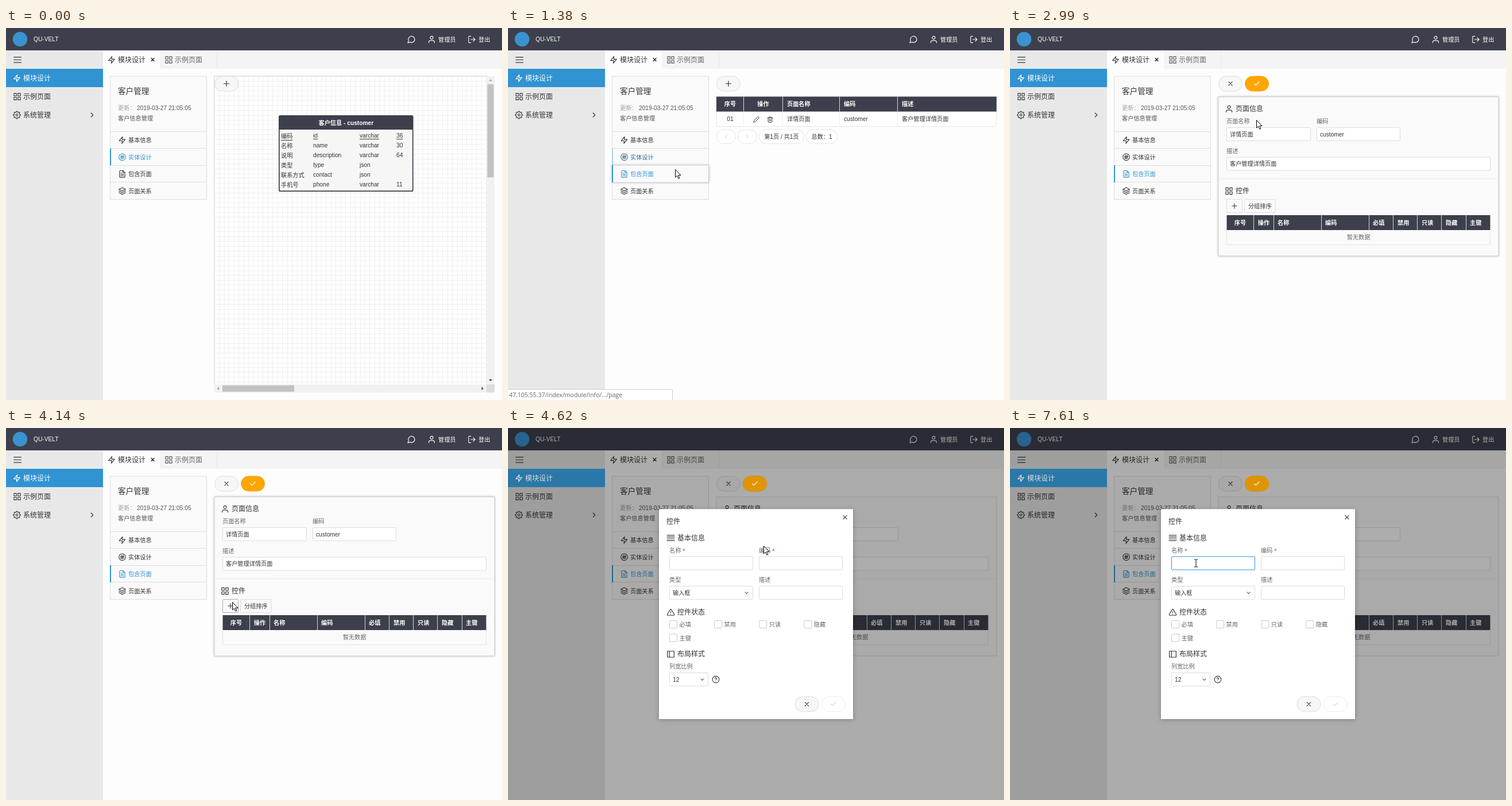
Animation, 864 px wide and 648 px high, one loop 8 s. Source, as an HTML page with a canvas:

```html
<!DOCTYPE html>
<html lang="zh-CN">
<head>
<meta charset="utf-8">
<title>模块设计</title>
<style>
html, body { margin: 0; width: 100%; height: 100%; overflow: hidden; background: #fdfdfd; }
canvas { display: block; }
</style>
</head>
<body>
<canvas id="stage" width="864" height="648"></canvas>
<script>
const g = document.getElementById('stage').getContext('2d');
const LOOP = 8000;
const FONT = '"Liberation Sans","Noto Sans CJK SC","Noto Sans CJK",sans-serif';
const DARK = '#3d404c', BLUE = '#3193d2', INK = '#333', SOFT = '#666', EDGE = '#dcdcdc', PANEL = '#fafafa';
const S = 10.2, M = 12;

// Pointer positions: start time, x, y
const POINTER = [
  [210, 442, 300], [450, 345, 270], [690, 291, 246], [1610, 296, 240], [1840, 372, 52],
  [2070, 436, 130], [2300, 437, 164], [2530, 429, 160], [3220, 425, 180],
  [3450, 410, 250], [3680, 398, 296], [3910, 394, 303], [4370, 401, 293],
  [4620, 445, 205], [4850, 372, 224], [5080, 324, 235.5]
];
const CARET = [[5310, 5540], [6000, 6690], [7150, 7610]];

const RING = 'M22 12a10 10 0 1 1-20 0a10 10 0 1 1 20 0';
const ICONS = {
  zap: 'M13 2L3 14h9l-1 8 10-12h-9z',
  grid: 'M3 3h7v7H3zM14 3h7v7h-7zM14 14h7v7h-7zM3 14h7v7H3z',
  gear: gearPath() + 'M15 12a3 3 0 1 1-6 0a3 3 0 1 1 6 0',
  hash: RING + 'M6.5 10h11M6.5 14.5h11M10.7 6.5l-1.5 11M15 6.5l-1.5 11',
  file: 'M14 2H6a2 2 0 0 0-2 2v16a2 2 0 0 0 2 2h12a2 2 0 0 0 2-2V8zM14 2v6h6M16 13H8M16 17H8M10 9H8',
  layers: 'M12 2L2 7l10 5 10-5zM2 17l10 5 10-5M2 12l10 5 10-5',
  user: 'M20 21v-2a4 4 0 0 0-4-4H8a4 4 0 0 0-4 4v2M16 7a4 4 0 1 1-8 0a4 4 0 1 1 8 0',
  exit: 'M9 21H5a2 2 0 0 1-2-2V5a2 2 0 0 1 2-2h4M16 17l5-5-5-5M21 12H9',
  chat: 'M21 11.5a8.4 8.4 0 0 1-12.5 7.4L3 21l1.9-5.7A8.4 8.4 0 1 1 21 11.5z',
  trash: 'M3 6h18M19 6v14a2 2 0 0 1-2 2H7a2 2 0 0 1-2-2V6M8 6V4a2 2 0 0 1 2-2h4a2 2 0 0 1 2 2v2M10 11v6M14 11v6',
  pencil: 'M17 3a2.8 2.8 0 1 1 4 4L7.5 20.5 2 22l1.5-5.5z',
  warn: 'M10.3 3.9L1.8 18a2 2 0 0 0 1.7 3h17a2 2 0 0 0 1.7-3L13.7 3.9a2 2 0 0 0-3.4 0zM12 9v4M12 17v.1',
  side: 'M2 3h20v18H2zM8 3v18',
  help: RING + 'M9 9a3 3 0 0 1 5.8 1c0 2-3 3-3 3M12 17v.1',
  check: 'M20 6L9 17l-5-5',
  cross: 'M19 5L5 19M5 5l14 14',
  plus: 'M12 2v20M2 12h20',
  down: 'M5 9l7 7 7-7',
  right: 'M9 4l8 8-8 8',
  left: 'M15 4l-8 8 8 8',
  menu: 'M1 4h22M1 12h22M1 20h22',
  lines: 'M1 4h22M1 9.3h22M1 14.6h22M1 20h22'
};
for (const k in ICONS) ICONS[k] = new Path2D(ICONS[k]);

function gearPath() {
  let d = '';
  for (let i = 0; i < 64; i++) {
    const a = i / 64 * Math.PI * 2;
    const r = 9.6 + 1.4 * Math.max(-1, Math.min(1, 2 * Math.cos(8 * a)));
    d += (i ? 'L' : 'M') + (12 + r * Math.cos(a)).toFixed(2) + ' ' + (12 + r * Math.sin(a)).toFixed(2);
  }
  return d + 'z';
}

function icon(name, cx, cy, size, color = INK, weight = 1.1) {
  const k = size / 24;
  g.save();
  g.translate(cx - size / 2, cy - size / 2);
  g.scale(k, k);
  g.lineWidth = weight / k;
  g.lineCap = g.lineJoin = 'round';
  g.strokeStyle = color;
  g.stroke(ICONS[name]);
  g.restore();
}

function text(s, x, cy, size = S, color = INK, align = 'left', weight = 400, family = FONT) {
  g.font = `${weight} ${size}px ${family}`;
  g.textAlign = align;
  g.fillStyle = color;
  g.fillText(s, x, cy + size * 0.37);
}

function rect(x, y, w, h, color) {
  g.fillStyle = color;
  g.fillRect(x, y, w, h);
}

// Outlined box given by its outer edges
function box(x1, y1, x2, y2, fill, stroke = EDGE, r = 0, lw = 1) {
  g.beginPath();
  g.roundRect(x1 + lw / 2, y1 + lw / 2, x2 - x1 - lw, y2 - y1 - lw, r);
  g.fillStyle = fill;
  g.fill();
  g.strokeStyle = stroke;
  g.lineWidth = lw;
  g.stroke();
}

function shadowBox(x1, y1, x2, y2, fill, blur, alpha, dy = 0) {
  g.save();
  g.shadowColor = `rgba(0,0,0,${alpha})`;
  g.shadowBlur = blur;
  g.shadowOffsetY = dy;
  rect(x1, y1, x2 - x1, y2 - y1, fill);
  g.restore();
}

function pill(x, name, size, fill = '#f7f7f7', stroke = EDGE, color = INK, y = 83.5) {
  box(x, y, x + 42, y + 27, fill, stroke, 13);
  icon(name, x + 21, y + 13.5, size, color, 1.2);
}

function triangle(cx, cy, angle, color) {
  g.save();
  g.translate(cx, cy);
  g.rotate(angle);
  g.beginPath();
  g.moveTo(-3, 1.5);
  g.lineTo(0, -1.8);
  g.lineTo(3, 1.5);
  g.fillStyle = color;
  g.fill();
  g.restore();
}

function activeItem(color, ink) {
  rect(0, 71, 169, 32, color);
  icon('zap', 19, 87.5, 14, ink, 1.3);
  text('模块设计', 30, 87.5, M, ink);
}

function saveButton(color, ink) {
  pill(409, 'check', 13, color, color, ink);
}

function frame() {
  rect(0, 0, 864, 648, '#fdfdfd');
  rect(0, 0, 864, 39, DARK);
  g.beginPath();
  g.arc(24.5, 19.5, 12.7, 0, 7);
  g.fillStyle = '#3a92d0';
  g.fill();
  text('QU-VELT', 48, 19.5, S, '#fff');
  icon('chat', 706, 20, 16, '#fff');
  icon('user', 741.5, 20, 15, '#fff');
  text('管理员', 753, 20, S, '#fff');
  icon('exit', 811.5, 20, 15, '#fff');
  text('登出', 823, 20, S, '#fff');

  rect(0, 39, 169, 609, '#e8e8e8');
  icon('menu', 20, 55.5, 14);
  activeItem(BLUE, '#fff');
  icon('grid', 19.5, 119.5, 15);
  text('示例页面', 30, 119.5, M);
  icon('gear', 19, 151.5, 14);
  text('系统管理', 30, 152, M);
  icon('right', 149.5, 151.5, 10.5);

  rect(169, 39, 695, 32, '#f4f4f4');
  rect(169, 39, 99, 32, '#fdfdfd');
  rect(367, 39, 1, 32, '#e9e9e9');
  icon('zap', 184, 55.5, 14);
  text('模块设计', 195, 55.5, M);
  icon('cross', 255.5, 55, 8.5, INK, 1.5);
  icon('grid', 283.5, 55.5, 15, '#555');
  text('示例页面', 294, 55.5, M, SOFT);
}

function card(t) {
  box(181, 83.5, 350, 299, PANEL);
  text('客户管理', 195, 109.5, 13.6);
  text('更新：', 195, 139, S, '#a0a0a0');
  text('2019-03-27 21:05:05', 228, 139, S, '#555');
  text('客户信息管理', 195, 157.5, S, '#555');
  for (const y of [180, 209, 239, 268]) rect(182, y, 167, 1, EDGE);

  const onPage = t >= 1380, hover = t >= 690 && t < 1840;
  if (hover) {
    shadowBox(181, 239, 350, 269, '#fff', 4, 0.3);
    box(181, 238.5, 350, 269.5, PANEL, '#d0d0d0');
  }
  const entity = !onPage ? BLUE : t < 1610 ? '#3d698c' : INK;
  const page = onPage || hover ? BLUE : INK;
  const rows = [['zap', '基本信息', INK], ['hash', '实体设计', entity], ['file', '包含页面', page], ['layers', '页面关系', INK]];
  rows.forEach(([name, label, color], i) => {
    const y = 195.3 + i * 29.5;
    icon(name, 202.5, y, 14, color);
    text(label, 213, y, S, color);
  });
  if (!onPage) rect(181, 210, 2, 29, BLUE);
  else {
    if (t < 1610) rect(181.5, 210, 1, 29, '#6aafdb');
    rect(181, 239, 2, 30, BLUE);
  }
}

function entityView() {
  const step = 8.45;
  rect(363, 84, 475, 537, '#fff');
  for (let x = 363; x < 837; x += step) rect(Math.round(x), 84, 1, 537, '#efefef');
  for (let y = 84; y < 621; y += step) rect(363, Math.round(y), 475, 1, '#efefef');
  for (let x = 363; x < 838; x += 2) rect(x, 83, 1, 1, '#bbb');
  for (let y = 84; y < 621; y += 2) rect(362, y, 1, 1, '#bbb');

  rect(837, 84, 14, 537, '#f1f1f1');
  rect(363, 621, 474, 14, '#f1f1f1');
  rect(837, 621, 14, 14, EDGE);
  rect(838.5, 98, 11, 162, '#c1c1c1');
  rect(377, 622.5, 125, 11, '#c1c1c1');
  triangle(844, 91, 0, '#a3a3a3');
  triangle(844, 613.5, Math.PI, '#444');
  triangle(369.5, 628, -Math.PI / 2, '#a3a3a3');
  triangle(830, 628, Math.PI / 2, '#444');
  pill(363, 'plus', 11);

  box(475, 152, 709.5, 285, '#f6f6f6', DARK, 2, 1.7);
  rect(476, 153, 232.5, 24, DARK);
  text('客户信息 - customer', 592.3, 165, S, '#fff', 'center', 700);
  const rows = [
    ['编码', 'id', 'varchar', '36'], ['名称', 'name', 'varchar', '30'],
    ['说明', 'description', 'varchar', '64'], ['类型', 'type', 'json'],
    ['联系方式', 'contact', 'json'], ['手机号', 'phone', 'varchar', '11']
  ];
  rows.forEach((row, i) => row.forEach((s, j) => {
    const x = [479, 535, 616, 680][j], y = 187.5 + i * 16.85 + (j ? 0 : 1.2);
    text(s, x, y);
    if (!i) rect(x, j ? 193 : 195, g.measureText(s).width, 1, INK);
  }));
}

function tableHead(x1, x2, y, cols, cells) {
  rect(x1, y, x2 - x1, 26, DARK);
  for (const x of cols) rect(x, y, 1, 26, '#d5d6da');
  cells.forEach(([s, x], i) => text(s, x, y + 13, S, '#fff', i < 2 ? 'center' : 'left', 700));
}

function listView(t) {
  const hot = t >= 2300;
  pill(363, 'plus', 11);
  box(363, 145, 851, 172, hot ? '#f2f2f2' : '#fff', '#e6e6e6');
  tableHead(363, 851, 119.5, [410, 478, 577, 678],
    [['序号', 387], ['操作', 444.5], ['页面名称', 486], ['编码', 585], ['描述', 686]]);
  for (const x of [410, 478, 577, 678]) rect(x, 146, 1, 26, '#ececec');
  text('01', 387, 158.5, S, INK, 'center');
  icon('pencil', 432.5, 159.5, 11.5, hot ? BLUE : INK, 1);
  icon('trash', 456.5, 159.5, 11.5, INK, 1);
  text('详情页面', 486, 158.5);
  text('customer', 585, 158.5);
  text('客户管理详情页面', 686, 158.5);
  for (const [a, b] of [[363, 397], [400, 434], [437, 516], [519, 574]])
    box(a, 176.5, b, 202, '#fff', '#e4e4e4', 12);
  icon('left', 380.5, 189.5, 9, '#ccc', 1);
  icon('right', 416.5, 189.5, 9, '#ccc', 1);
  text('第1页 / 共1页', 476.5, 189.5, S, INK, 'center');
  text('总数：1', 528.5, 189.5);
}

function field(x1, y1, x2, value = '', stroke = EDGE) {
  box(x1, y1, x2, y1 + 24, '#fff', stroke, 1);
  text(value, x1 + 6, y1 + 12);
}

function formView(t) {
  const over = t < 4370;
  pill(363, 'cross', 10.5);
  saveButton('#ffa500', '#fff');
  if (over) shadowBox(363, 120, 851, 397, '#fff', 4, 0.35);
  box(362.5, 119.5, 851.5, 397.5, PANEL, over ? '#cfcfcf' : EDGE);
  icon('user', 381.5, 141, 15);
  text('页面信息', 393, 141, M);
  text('页面名称', 377, 162.5, S, SOFT);
  text('编码', 534, 162.5, S, SOFT);
  field(377, 173, 524, '详情页面');
  field(534, 173, 680, 'customer');
  text('描述', 377, 214.3, S, SOFT);
  field(377, 224.5, 837, '客户管理详情页面');
  rect(363, 262, 488, 1, '#ececec');
  icon('grid', 381.5, 284, 15);
  text('控件', 393, 284, M);
  const hot = t >= 3680 && over;
  box(377, 298, 405, 322, PANEL, hot ? '#aaa' : EDGE, 1);
  icon('plus', 391, 310, 10);
  box(408, 298, 462.5, 322, PANEL, EDGE, 1);
  text('分组排序', 435.3, 310, S, INK, 'center');
  box(377, 351, 837, 378, PANEL, '#e6e6e6');
  tableHead(377.5, 836.5, 326, [424, 459, 542, 625, 667, 709, 751, 794],
    [['序号', 401], ['操作', 442], ['名称', 466], ['编码', 549], ['必填', 632],
     ['禁用', 675], ['只读', 717], ['隐藏', 759], ['主键', 801]]);
  text('暂无数据', 607, 364.5, S, SOFT, 'center');
}

function label(s, x, y, required) {
  text(s, x, y, S, SOFT);
  if (required) text('*', x + 23, y + 1.5, 12, '#b5683a');
}

function section(name, s, y) {
  icon(name, 283.5, y, 14, INK, 1.2);
  text(s, 295, y, M);
}

function dialog(t) {
  // The accents stay brighter than the rest of the dimmed page
  rect(0, 0, 864, 648, 'rgba(0,0,0,0.32)');
  activeItem('#2a78a8', '#ddd');
  saveButton('#e09400', '#eee');

  shadowBox(263, 141.5, 601, 507, '#fff', 8, 0.25, 1);
  box(263, 141.5, 601, 507, '#fff', '#fff', 2);
  text('控件', 276, 163, M);
  icon('cross', 587, 155.5, 11);

  section('lines', '基本信息', 191.5);
  label('名称', 281, 213, true);
  label('编码', 437, 213, true);
  field(281, 223.5, 427, '', t >= 5540 ? BLUE : t >= 5310 ? '#8cc2e5' : EDGE);
  field(437, 223.5, 583);
  label('类型', 281, 264.7);
  label('描述', 437, 264.7);
  field(281, 275, 427, '输入框');
  field(437, 275, 583);
  icon('down', 415.5, 287, 9, SOFT);

  section('warn', '控件状态', 321);
  ['必填', '禁用', '只读', '隐藏', '主键'].forEach((s, i) => {
    const x = 281 + i % 4 * 78.1, y = i < 4 ? 335 : 358.5;
    box(x, y, x + 14, y + 14, '#fff', '#c8c8c8', 1);
    text(s, x + 17.5, y + 7.3, S, SOFT);
  });

  section('side', '布局样式', 394);
  label('列宽比例', 281, 415.7);
  field(281, 426, 349, '12');
  icon('down', 338.5, 438, 9, SOFT);
  icon('help', 362, 438, 14);
  pill(499.5, 'cross', 10.5, '#f7f7f7', EDGE, INK, 467.5);
  pill(546, 'check', 13, '#fff', '#ebebeb', '#ddd', 467.5);
  if (CARET.some(([a, b]) => t >= a && t < b)) rect(287, 229, 1, 12, '#222');
}

function statusBar() {
  box(-2, 629, 287, 650, '#fff', '#cfcfcf', 2);
  text('47.105.55.37/index/module/info/.../page', 2, 639.5, 10.5, SOFT, 'left', 400, '"Open Sans",sans-serif');
}

function pointer(t) {
  const p = POINTER.filter(q => q[0] <= t).pop();
  if (!p) return;
  g.save();
  g.translate(p[1], p[2]);
  g.lineWidth = 1;
  g.strokeStyle = '#000';
  if (t >= 5080) {
    g.stroke(new Path2D('M-3 -6.5h2.5l.5 .5l.5-.5H3M0 -6V6M-3 6.5h2.5l.5-.5l.5 .5H3'));
  } else {
    const arrow = new Path2D('M.5 .5V14l3-2.8 2.2 5 2.2-1-2.2-4.7H10z');
    g.fillStyle = '#fff';
    g.fill(arrow);
    g.stroke(arrow);
  }
  g.restore();
}

function draw(t) {
  frame();
  card(t);
  if (t < 1380) entityView();
  else if (t < 2990) listView(t);
  else formView(t);
  if (t >= 4370) dialog(t);
  if (t >= 690 && t < 1840) statusBar();
  pointer(t);
}

const start = performance.now();
function tick() {
  draw((performance.now() - start) % LOOP);
  requestAnimationFrame(tick);
}
tick();
</script>
</body>
</html>
```
